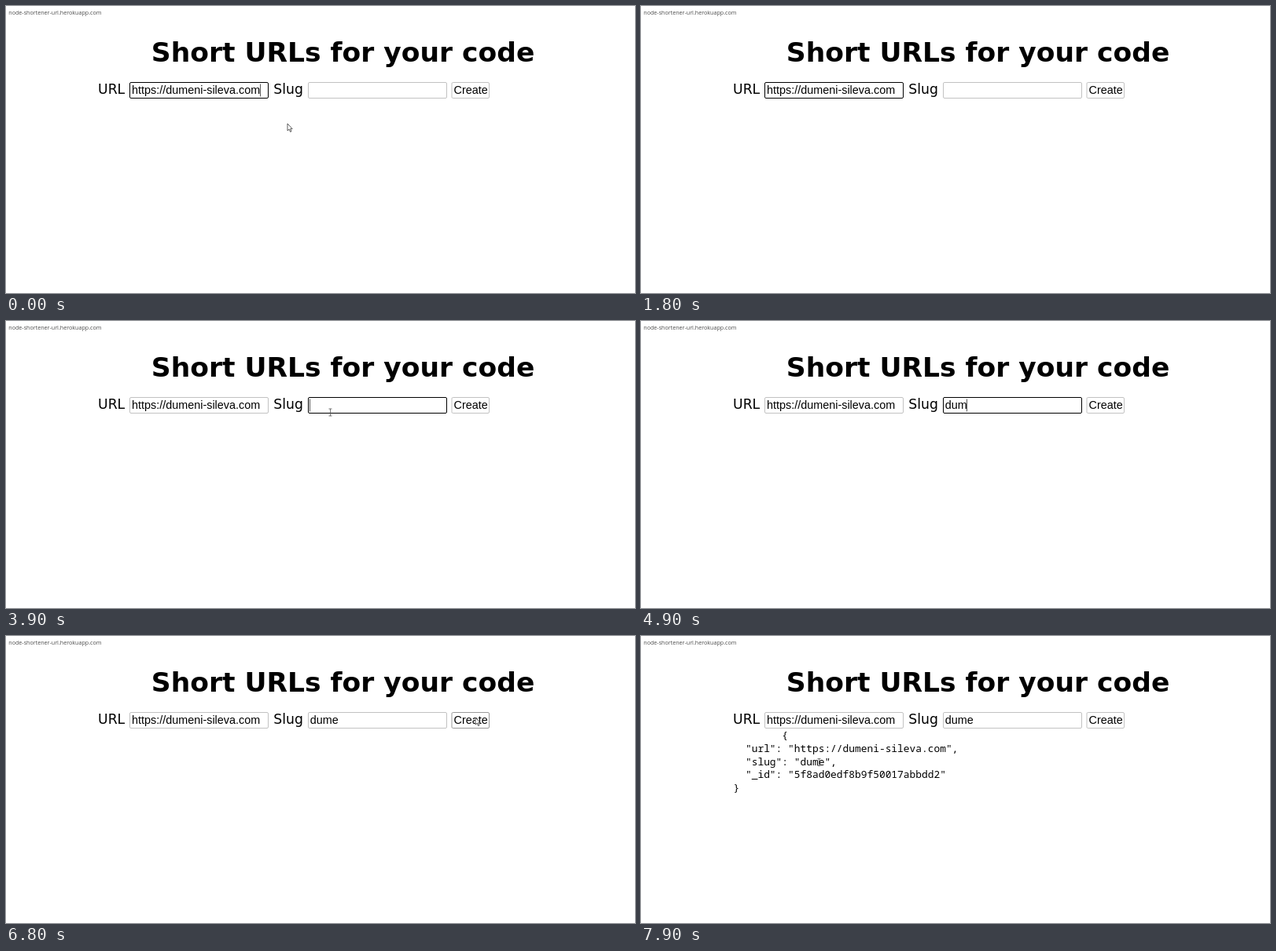
These frames come from a looping animation (800 px wide and 366 px high, 8 s). An HTML page:

```html
<!DOCTYPE html>
<html lang="en">
<head>
<meta charset="utf-8">
<title>Short URLs for your code</title>
<style>
  html, body { margin: 0; width: 100%; height: 100%; overflow: hidden; background: #fff; }
  svg { display: block; width: 800px; height: 366px; }
  text { white-space: pre; }
  .address { font: 7.15px "Open Sans", "Noto Sans", sans-serif; fill: #4c4c4c; }
  .title { font: bold 34.5px "DejaVu Sans", sans-serif; }
  .label { font: 17.25px "DejaVu Sans", sans-serif; }
  .field { font: 14.4px "Liberation Sans", Arial, sans-serif; }
  .json { font: 12.88px "Noto Sans Mono", monospace; }
  .box { fill: #fff; stroke: #c2c2c2; stroke-width: 1; }
  .box.hover { stroke: #999; }
  .box.focus { stroke: #000; }
  .caret { stroke: #555; stroke-width: 1; }
</style>
</head>
<body>
<svg viewBox="0 0 800 366">
  <text class="address" x="3.3" y="11">node-shortener-url.herokuapp.com</text>
  <text class="title" x="184.8" y="71">Short URLs for your code</text>

  <text class="label" x="117" y="112">URL</text>
  <rect class="box" id="urlBox" x="157.5" y="97.5" width="176" height="20" rx="1.5"/>
  <text class="field" x="160" y="112">https://dumeni-sileva.com</text>
  <path class="caret" id="urlCaret" d="M323.5 99.5v16"/>

  <text class="label" x="340.3" y="112">Slug</text>
  <rect class="box" id="slugBox" x="384.5" y="97.5" width="176" height="20" rx="1.5"/>
  <text class="field" id="slugText" x="386.8" y="112"></text>
  <path class="caret" id="slugCaret" d="M0 99.5v16"/>

  <rect class="box" id="button" x="567" y="97.5" width="47.5" height="20" rx="1.5"/>
  <text class="field" x="569.5" y="112">Create</text>

  <g id="result" class="json"></g>

  <path id="arrow" d="M0 0V9L2.1 7.2L3.6 10.5L5 9.9L3.6 6.7H6.2Z"
        fill="#fff" stroke="#333" stroke-width=".8" stroke-linejoin="round"/>
  <path id="beam" d="M-2 -4.5H2M0 -4.5V4.5M-2 4.5H2" fill="none" stroke="#555" stroke-width=".8"/>
</svg>
<script>
const LOOP = 8000, STEP = 100;
const SLUG = "dume";
const KEY_TIMES = [4500, 4700, 4900, 5200];
const RESULT_AT = 7100;
const URL_BLUR = 3200, SLUG_FOCUS = 3700, SLUG_BLUR = 6500;

// Each stretch in which the pointer is visible: [time, x, y] stops.
const MOVES = [
  [[0, 358, 150], [300, 358, 150], [700, 10, 7], [800, 10, 7]],
  [[2900, 63, 26], [3200, 375, 74], [3300, 398.5, 81.5], [3600, 412, 112], [3700, 412.5, 116.5], [4500, 412.5, 116.5]],
  [[5800, 414.5, 116.5], [6000, 414.5, 116.5], [6300, 597, 104], [7300, 597, 104],
   [7500, 390, 172], [7700, 205, 176], [7800, 226.5, 161], [8000, 226.5, 161]]
];

const $ = id => document.getElementById(id);
const show = (el, on) => el.setAttribute("visibility", on ? "visible" : "hidden");
const ease = p => p * p * (3 - 2 * p);
const inside = (p, x0, y0, x1, y1) => p.x >= x0 && p.x <= x1 && p.y >= y0 && p.y <= y1;
const blinkOn = elapsed => elapsed % 1000 < 500;

const jsonLines = [
  "        {",
  '  "url": "https://dumeni-sileva.com",',
  `  "slug": "${SLUG}",`,
  '  "_id": "5f8ad0edf8b9f50017abbdd2"',
  "}"
];
jsonLines.forEach((line, i) => {
  const row = document.createElementNS("http://www.w3.org/2000/svg", "text");
  row.setAttribute("x", 117.5);
  row.setAttribute("y", 131.2 + i * 16.75);
  row.textContent = line;
  $("result").append(row);
});

function pointerAt(t) {
  const stops = MOVES.find(m => t >= m[0][0] && t < m[m.length - 1][0]);
  if (!stops) return null;
  const i = stops.findIndex(s => s[0] > t);
  const [t0, x0, y0] = stops[i - 1], [t1, x1, y1] = stops[i];
  const p = ease((t - t0) / (t1 - t0));
  return { x: x0 + (x1 - x0) * p, y: y0 + (y1 - y0) * p };
}

function drawPointer(t) {
  const p = pointerAt(t);
  const overText = p && (
    inside(p, 186, 36, 672, 84) ||
    inside(p, 157, 97, 334, 118) ||
    inside(p, 384, 97, 561, 118) ||
    (t >= RESULT_AT && inside(p, 117, 121, 403, 201)));
  show($("arrow"), p && !overText);
  show($("beam"), overText);
  if (p) $(overText ? "beam" : "arrow").setAttribute("transform", `translate(${p.x} ${p.y})`);
  $("button").classList.toggle("hover", !!p && inside(p, 567, 97, 615, 118));
}

function draw(time) {
  const t = Math.floor((time % LOOP) / STEP) * STEP;
  const urlFocus = t < URL_BLUR;
  const slugFocus = t >= SLUG_FOCUS && t < SLUG_BLUR;
  const typed = KEY_TIMES.filter(k => k <= t).length;
  const lastInput = typed ? KEY_TIMES[typed - 1] : SLUG_FOCUS;

  $("urlBox").classList.toggle("focus", urlFocus);
  $("slugBox").classList.toggle("focus", slugFocus);
  show($("urlCaret"), urlFocus && blinkOn(t + 100));

  const slugText = $("slugText");
  slugText.textContent = SLUG.slice(0, typed);
  const caretX = 386.5 + (typed ? Math.round(slugText.getComputedTextLength()) : 0);
  $("slugCaret").setAttribute("transform", `translate(${caretX} 0)`);
  show($("slugCaret"), slugFocus && blinkOn(t - lastInput));

  show($("result"), t >= RESULT_AT);
  drawPointer(t);
}

const start = performance.now();
function tick() {
  draw(performance.now() - start);
  requestAnimationFrame(tick);
}
tick();
</script>
</body>
</html>
```
